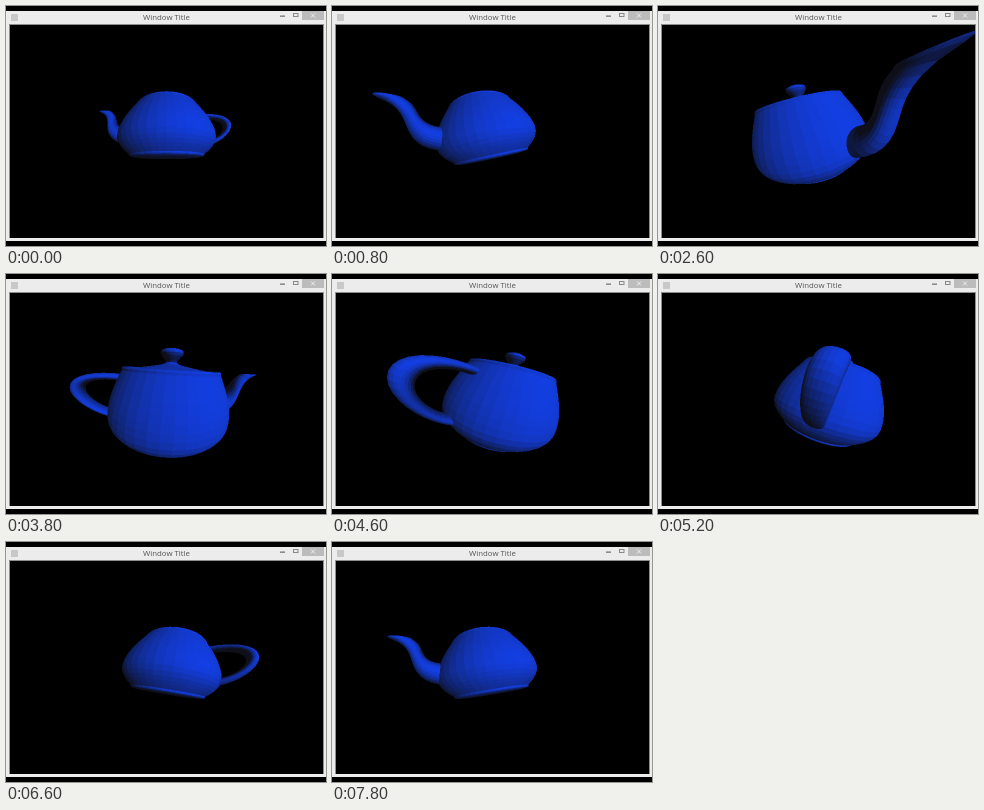
Write an HTML page with a canvas that moves like this. It is 320 px wide and 240 px high and loops after 8 s.

```html
<!DOCTYPE html>
<html lang="en">
<head>
<meta charset="utf-8">
<title>Window Title</title>
<style>
  html, body { margin: 0; width: 100%; height: 100%; overflow: hidden; background: #000; }
  canvas { position: absolute; left: 0; top: 0; width: 320px; height: 240px; }
  #title {
    position: absolute; left: 0; top: 5px; width: 321px; height: 12px;
    font: 7.8px/12px "Open Sans", "Noto Sans", sans-serif;
    color: #555; text-align: center; white-space: nowrap;
  }
</style>
</head>
<body>
<canvas id="stage" width="320" height="240"></canvas>
<div id="title">Window Title</div>
<script>
const LOOP = 8000, TURN = 0.05;              // ms, degrees per ms
const VIEW = { x: 4, y: 19, w: 313, h: 213 };
const SS = 2;                                // supersampling
const FOCAL_X = 97, FOCAL_Y = 88.5, DIST = 4.05, BASE_Y = -1.26;
const CX = 160.5, CY = 125;
const TILT = 20 * Math.PI / 180;
const LIGHT = [0.43, 0.28, 0.86];

const ctx = document.getElementById('stage').getContext('2d');
const W = VIEW.w * SS, H = VIEW.h * SS;
const buffer = document.createElement('canvas');
buffer.width = W;
buffer.height = H;
const bctx = buffer.getContext('2d');
const image = bctx.createImageData(W, H);
const pixels = new Uint32Array(image.data.buffer);
const depth = new Float32Array(W * H);

// ---- Model: z is up, the spout points along +x ----

const quads = [];
const smooth = t => t * t * (3 - 2 * t);
const mix = (a, b, t) => a + (b - a) * t;

// Cubic curve through the x, z plane
function curve(...p) {
  return t => {
    const s = 1 - t;
    const k = [s * s * s, 3 * s * s * t, 3 * s * t * t, t * t * t];
    return [0, 1].map(i => k.reduce((sum, w, j) => sum + w * p[j][i], 0));
  };
}

// Splits a surface point(u, v), both 0..1, into quads
function addSurface(point, nu, nv) {
  for (let i = 0; i < nu; i++) {
    for (let j = 0; j < nv; j++) {
      const u0 = i / nu, u1 = (i + 1) / nu, v0 = j / nv, v1 = (j + 1) / nv;
      quads.push([point(u0, v0), point(u1, v0), point(u1, v1), point(u0, v1)]);
    }
  }
}

function addLathe(radius, height, rows = 8) {
  addSurface((u, v) => {
    const r = radius(u), a = v * 2 * Math.PI;
    return [r * Math.cos(a), r * Math.sin(a), height(u)];
  }, rows, 48);
}

// A tube stretched between its inner and outer edge
function addTube(inner, outer, width, rows) {
  addSurface((u, v) => {
    const [ax, az] = inner(u), [bx, bz] = outer(u);
    const side = v < 0.5 ? 1 : -1;
    const s = v < 0.5 ? v * 2 : 2 - v * 2;
    const m = smooth(s);
    return [mix(ax, bx, m), side * width(u) * 3 * s * (1 - s), mix(az, bz, m)];
  }, rows, 24);
}

// Knob, lid, rim
addLathe(t => 2.4 * t * (1 - t) ** 2 + 0.2 * t ** 3, t => 3.15 - 0.45 * smooth(t));
addLathe(t => 0.2 + 1.1 * smooth(t), t => 2.7 - 0.3 * t);
addLathe(t => 1.45 - 0.05 * Math.cos(Math.PI * t), t => 2.4 + 0.1 * Math.sin(Math.PI * t), 5);
// Body, belly, bottom
addLathe(t => 1.5 + 0.75 * t - 0.25 * t ** 3, t => 2.4 - 1.5 * t);
addLathe(t => 2 - 0.5 * smooth(t), t => 0.15 + 0.75 * (1 - t) ** 1.8);
addLathe(t => 1.5 * (1 - t ** 3), t => 0.15 * (1 - t) ** 2);
// Handle
addTube(curve([-1.6, 2.025], [-3.2, 2.2], [-2.8, 1.2], [-2, 0.9]),
        curve([-1.5, 2.25], [-3.7, 2.45], [-3.2, 1.1], [-1.9, 0.6]),
        () => 0.3, 20);
// Spout and its lip
addTube(curve([1.7, 1.425], [2.6, 1.425], [2.3, 2.1], [2.7, 2.4]),
        curve([1.7, 0.6], [3.1, 0.825], [2.4, 2.025], [3.3, 2.4]),
        t => mix(0.66, 0.25, smooth(t)), 14);
const lipHeight = t => 2.4 + 0.06 * Math.sin(Math.PI * t);
addTube(t => [2.7 + 0.1 * t, lipHeight(t)],
        t => [3.3 - 0.1 * t + 0.12 * Math.sin(Math.PI * t), lipHeight(t)],
        t => 0.25 - 0.1 * t, 5);

// ---- Rendering ----

const sub = (a, b) => [a[0] - b[0], a[1] - b[1], a[2] - b[2]];
const cross = (a, b) => [a[1] * b[2] - a[2] * b[1],
                         a[2] * b[0] - a[0] * b[2],
                         a[0] * b[1] - a[1] * b[0]];
const dot = (a, b) => a[0] * b[0] + a[1] * b[1] + a[2] * b[2];

// Leans the pot about its foot, then turns it about the vertical
function placer(angle) {
  const ct = Math.cos(TILT), st = Math.sin(TILT);
  const ca = Math.cos(angle), sa = Math.sin(angle);
  return ([x, y, z]) => {
    const py = z * ct + y * st, pz = y * ct - z * st;
    return [-x * ca + pz * sa, py + BASE_Y, x * sa + pz * ca];
  };
}

// Screen position in the buffer, with inverse depth
function project([x, y, z]) {
  const inv = 1 / Math.max(0.12, DIST - z);
  return [(CX + FOCAL_X * x * inv - VIEW.x) * SS,
          (CY - FOCAL_Y * y * inv - VIEW.y) * SS, inv];
}

function shade(p) {
  const n = cross(sub(p[2], p[0]), sub(p[3], p[1]));
  const d = Math.max(0, dot(n, LIGHT) / (Math.hypot(...n) || 1));
  const r = 14 + 6 * d, g = 15 + 48 * d, b = 24 + 202 * d;
  return (255 << 24 | b << 16 | g << 8 | r) >>> 0;
}

function fillTriangle(a, b, c, color) {
  const area = (b[0] - a[0]) * (c[1] - a[1]) - (b[1] - a[1]) * (c[0] - a[0]);
  if (Math.abs(area) < 1e-6) return;
  const x0 = Math.max(0, Math.floor(Math.min(a[0], b[0], c[0])));
  const x1 = Math.min(W - 1, Math.ceil(Math.max(a[0], b[0], c[0])));
  const y0 = Math.max(0, Math.floor(Math.min(a[1], b[1], c[1])));
  const y1 = Math.min(H - 1, Math.ceil(Math.max(a[1], b[1], c[1])));
  for (let y = y0; y <= y1; y++) {
    for (let x = x0; x <= x1; x++) {
      const px = x + 0.5, py = y + 0.5;
      const wb = ((px - a[0]) * (c[1] - a[1]) - (py - a[1]) * (c[0] - a[0])) / area;
      const wc = ((b[0] - a[0]) * (py - a[1]) - (b[1] - a[1]) * (px - a[0])) / area;
      const wa = 1 - wb - wc;
      if (wa < 0 || wb < 0 || wc < 0) continue;
      const inv = wa * a[2] + wb * b[2] + wc * c[2];
      const i = y * W + x;
      if (inv > depth[i]) {
        depth[i] = inv;
        pixels[i] = color;
      }
    }
  }
}

function drawPot(angle) {
  const place = placer(angle);
  depth.fill(0);
  pixels.fill(0xff000000);
  for (const quad of quads) {
    const p = quad.map(place), s = p.map(project), color = shade(p);
    fillTriangle(s[0], s[1], s[2], color);
    fillTriangle(s[0], s[2], s[3], color);
  }
  bctx.putImageData(image, 0, 0);
  ctx.imageSmoothingQuality = 'high';
  ctx.drawImage(buffer, VIEW.x, VIEW.y, VIEW.w, VIEW.h);
}

function rect(color, x, y, w, h) {
  ctx.fillStyle = color;
  ctx.fillRect(x, y, w, h);
}

function drawWindow() {
  rect('#000', 0, 0, 320, 240);
  rect('#ececec', 0, 5, 320, 230);
  rect('#8c8f8c', VIEW.x - 1, VIEW.y - 1, VIEW.w + 2, VIEW.h + 1);
  rect('#c8c8c8', 5, 8, 7, 7);
  rect('#777', 274, 9.5, 5, 1.3);
  ctx.strokeStyle = '#888';
  ctx.lineWidth = 1;
  ctx.strokeRect(287.5, 7.5, 4.5, 3);
  rect('#bcbcbc', 296, 5, 22, 9);
  ctx.strokeStyle = '#eee';
  ctx.beginPath();
  ctx.moveTo(305, 7.5);
  ctx.lineTo(309, 11.5);
  ctx.moveTo(309, 7.5);
  ctx.lineTo(305, 11.5);
  ctx.stroke();
}

// ---- Timing ----

// Poses change twice as often while the spout swings past the viewer
function heldTime(t) {
  const hold = t >= 1600 && t < 3000 ? 100 : 200;
  return Math.floor(t / hold) * hold;
}

let shown = -1;

function update() {
  const t = heldTime(performance.now() % LOOP);
  if (t !== shown) {
    shown = t;
    drawPot(t * TURN * Math.PI / 180);
  }
  requestAnimationFrame(update);
}

drawWindow();
update();
</script>
</body>
</html>
```
